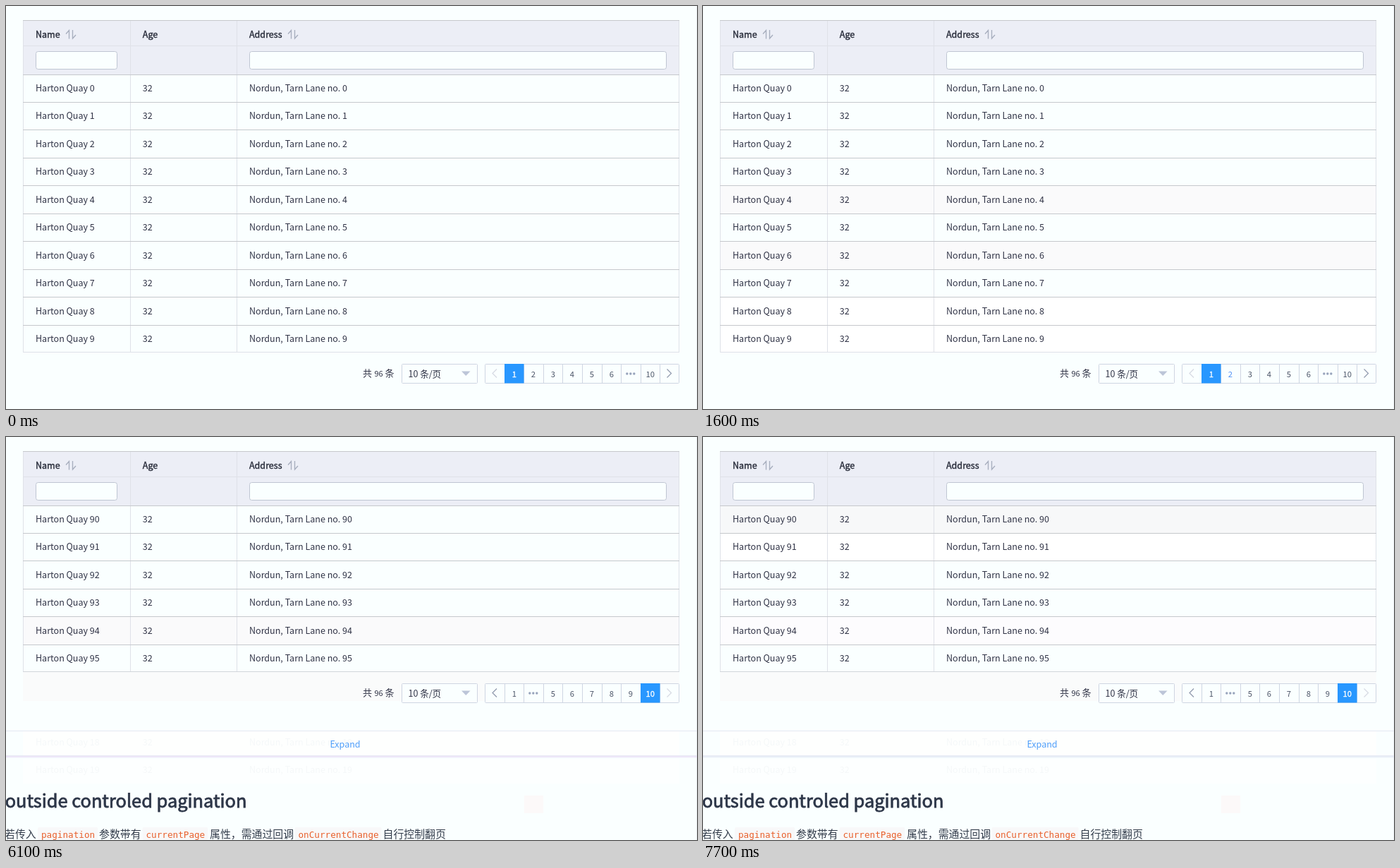
Animation, 980 px wide and 571 px high, one loop 8000 ms. Source, as an HTML page:

```html
<!DOCTYPE html>
<html lang="en">
<head>
<meta charset="utf-8">
<title>Paged table</title>
<style>
  html, body { margin: 0; width: 100%; height: 100%; overflow: hidden; background: #faffff; }
  svg { display: block; }
  text { font: 12.53px "Noto Sans CJK SC", "Noto Sans CJK", "Open Sans", sans-serif; fill: #303346; white-space: pre; }
  .head { fill: #2a2e3c; stroke: #2a2e3c; stroke-width: .4px; }
  .page { font-size: 11.2px; fill: #4c5568; text-anchor: middle; }
  .title { font-size: 25.4px; fill: #2d3648; stroke: #2d3648; stroke-width: .8px; }
  .note { font-size: 14.9px; fill: #333c4b; }
  .code { font: 12.65px "DejaVu Sans Mono", "Noto Sans Mono", monospace; fill: #e8602c; }
</style>
</head>
<body>
<svg id="stage" width="980" height="571" viewBox="0 0 980 571"></svg>
<script>
const LOOP = 8000;
const BG = '#faffff', LINE = '#c6c8cc', PALE = '#dfe1e8', HOVER = '#f7f8f9', TRACE = '#fafafb', WHITE = '#ffffff';
const COLS = [42, 193.8, 345];
const first = [1, 2, 3, 4, 5, 6, 0, 10];
const last = [1, 0, 5, 6, 7, 8, 9, 10];
const seen = { 4: TRACE, 6: TRACE, 8: WHITE, 9: WHITE };

// Each step: start time, current page, row fills, hovered page, bar shadow
const steps = [
  { at: 0, page: 1, fills: {} },
  { at: 1000, page: 1, fills: { ...seen, 9: HOVER } },
  { at: 1600, page: 1, fills: seen, over: 2 },
  { at: 2700, page: 2, fills: seen },
  { at: 4800, page: 2, fills: seen, over: 10 },
  { at: 6100, page: 10, fills: { 4: TRACE }, shadow: '#ece4f8' },
  { at: 6900, page: 10, fills: { 4: '#fdfcfe' }, shadow: '#e6ebf5' },
  { at: 7700, page: 10, fills: { 0: HOVER, 1: WHITE, 4: '#fdfcfe' }, shadow: '#e6ebf5' }
];

const rect = (x, y, w, h, fill, more = '') =>
  `<rect x="${x}" y="${y}" width="${w}" height="${h}" fill="${fill}" ${more}/>`;
const box = (x, y, w, h, stroke, r = 0) =>
  rect(x + .5, y + .5, w, h, BG, `stroke="${stroke}" rx="${r}"`);
const text = (x, y, s, cls = '', style = '') =>
  `<text x="${x}" y="${y}" class="${cls}" style="${style}">${s}</text>`;
const path = (d, stroke, width = 1) =>
  `<path d="${d}" fill="none" stroke="${stroke}" stroke-width="${width}"/>`;

const rowTop = i => Math.floor(97 + 39.45 * i);
const rowBase = i => Math.round(121 + 39.45 * i);

function rowText(i, n, style = '') {
  return ['Harton Quay ' + n, '32', 'Nordun, Tarn Lane no. ' + n]
    .map((s, c) => text(COLS[c], rowBase(i), s, '', style)).join('');
}

function sortIcon(x) {
  return path(`M${x} 39.5L${x + 4.5} 34.5V46.5M${x + 9.5} 34V46L${x + 14} 41`, '#a6adbd', 1.3);
}

function table({ page, fills }) {
  const count = page === 10 ? 6 : 10;
  const bottom = page === 10 ? 332 : 490;
  let out = rect(24, 20, 931, 77, '#eceef6');
  for (let i = 0; i < count; i++) {
    const y = rowTop(i);
    const end = i === count - 1 ? bottom : rowTop(i + 1);
    out += rect(24, y, 931, end - y, fills[i] || BG);
  }
  for (const x of [24, 176, 327, 954]) out += rect(x, 21, 1, bottom - 20, PALE);
  out += rect(24, 20, 931, 1, LINE) + rect(24, 56, 931, 1, PALE);
  for (let i = 0; i < count; i++) {
    out += rect(24, rowTop(i), 931, 1, LINE) + rowText(i, (page - 1) * 10 + i);
  }
  out += rect(24, bottom, 931, 1, page === 10 ? '#d2d5da' : PALE);
  out += ['Name', 'Age', 'Address'].map((s, c) => text(COLS[c], 45, s, 'head')).join('');
  out += sortIcon(85) + sortIcon(400);
  return out + box(42, 64, 115, 25, '#bfc5d2', 3) + box(345, 64, 591, 25, '#bfc5d2', 3);
}

function pager({ page, over }) {
  const edge = '#cfd5e2', pitch = 27.6;
  const y = page === 10 ? 349 : 507;
  const left = i => Math.round(679 + pitch * i);
  const arrow = (x, dir, off) =>
    path(`M${x - 3 * dir} ${y + 7.5}L${x + 3 * dir} ${y + 13.5}L${x - 3 * dir} ${y + 19.5}`, off ? '#d6dae3' : '#8f99ad', 1.2);

  let out = text(506, y + 18, '共', '', 'font-size:13px') +
    text(522.5, y + 18, '96', '', 'font-size:11px') +
    text(537.5, y + 18, '条', '', 'font-size:13px');
  out += box(561, y, 107, 27, edge, 1) + text(570.5, y + 19, '10 条/页');
  out += `<path d="M646 ${y + 10.5}h12.5l-6.25 6.5z" fill="#bcc5d8"/>`;
  out += box(679, y, 275, 27, edge, 1);
  for (let i = 1; i < 10; i++) out += rect(left(i), y, 1, 28, edge);

  (page === 10 ? last : first).forEach((n, i) => {
    const x = left(i + 1), mid = x + 13.8;
    if (n === 0) {
      for (const d of [-5, 0, 5]) out += `<circle cx="${mid + d}" cy="${y + 14}" r="1.7" fill="#97a3bb"/>`;
      return;
    }
    if (n === page) out += rect(x, y, 27.5, 27.5, '#2897ff');
    const color = n === page ? 'fill:#fff;stroke:#fff;stroke-width:.3px' : n === over ? 'fill:#5292f5' : '';
    out += text(mid, y + 19, n, 'page', color);
  });
  return out + arrow(693, -1, page === 1) + arrow(940.5, 1, page === 10);
}

// Faint remains of the longer page below the short table
function remains() {
  const faint = 'fill:#f5f8f9';
  return rect(24, 333, 931, 41, '#fafbfb') + rect(24, 417, 931, 34, '#fefffe') + rect(24, 456, 931, 35, '#fdffff') +
    rowText(8, 18, faint) + rowText(9, 19, faint) + rect(735, 508, 27, 25, '#fcf9f9');
}

function footer(shadow) {
  const code = (x, s) =>
    rect(x - 5, 553, s.length * 7.616 + 9, 18, '#f8f8f9', 'rx="2"') + text(x, 568, s, 'code');
  return rect(0, 416, 980, 1, '#e5e8f2') + rect(0, 451, 980, 1, '#e8ebf4') +
    [1, .7, .35].map((o, i) => rect(0, 452 + i, 980, 1, shadow, `opacity="${o}"`)).join('') +
    text(481, 440, 'Expand', '', 'fill:#4d9dfa;text-anchor:middle') +
    text(-1.3, 525, 'outside controled pagination', 'title') +
    text(-2, 568, '若传入', 'note') + code(50, 'pagination') +
    text(132, 568, '参数带有', 'note') + code(198.5, 'currentPage') +
    text(289, 568, '属性，需通过回调', 'note') + code(414.5, 'onCurrentChange') +
    text(534.5, 568, '自行控制翻页', 'note');
}

const stage = document.getElementById('stage');
let shown;

function draw(step) {
  const short = step.page === 10;
  stage.innerHTML = rect(0, 0, 980, 571, BG) + rect(979, 0, 1, 571, '#eef3f6') +
    (short ? remains() : '') + table(step) + pager(step) + (short ? footer(step.shadow) : '');
}

const start = performance.now();
function tick() {
  const t = (performance.now() - start) % LOOP;
  const step = steps.filter(s => s.at <= t).pop();
  if (step !== shown) draw(shown = step);
  requestAnimationFrame(tick);
}
tick();
</script>
</body>
</html>
```
